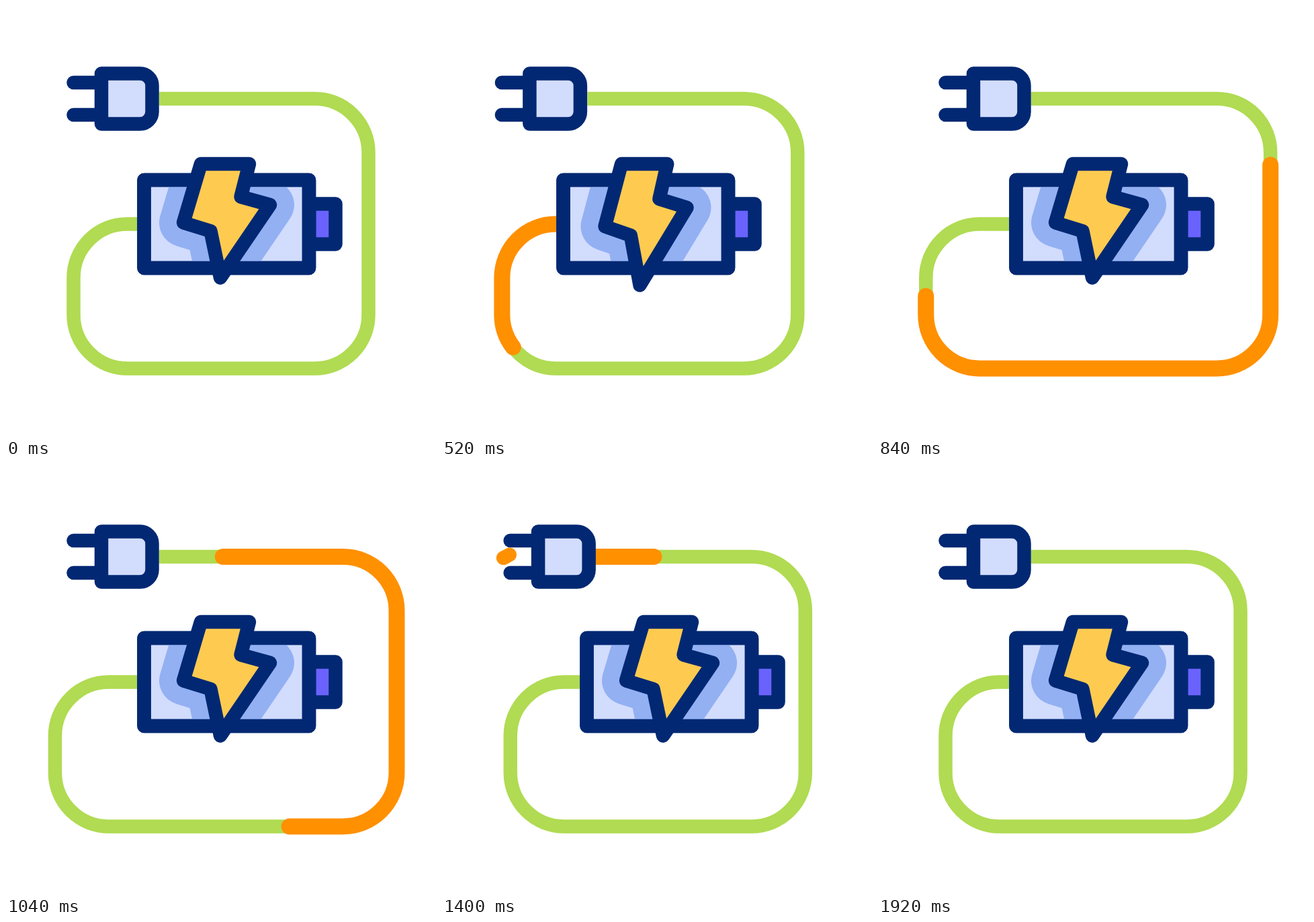
An HTML page with a canvas for the animation above (2080 ms loop, 640 by 640 pixels).

```html
<!DOCTYPE html>
<html lang="en">
<head>
<meta charset="utf-8">
<title>Charging battery</title>
<style>
  html, body { margin: 0; width: 100%; height: 100%; overflow: hidden; background: #fff; }
  canvas { display: block; width: 640px; height: 640px; }
</style>
</head>
<body>
<canvas id="stage" width="640" height="640"></canvas>
<script>
const ctx = document.getElementById('stage').getContext('2d');
const LOOP = 2080, STEP = 40, LINE = 20.5;
const NAVY = '#022873', LILAC = '#d2dcfd', BLUE = '#93b0f3', YELLOW = '#fecb50',
      PURPLE = '#6a62fc', GREEN = '#b0db52', ORANGE = '#ff9000';

const BOLT = [[290, 235], [362, 235], [349.5, 284], [393, 296], [319, 404.5], [304.5, 335], [264, 322.5]];
const SPARK = [[99.5, 135], [82, 144], [64, 131], [45, 144], [32, 136]];

const part = (t, from, to) => Math.min(1, Math.max(0, (t - from) / (to - from)));
const smooth = u => u * u * (3 - 2 * u);

function inOut(t, from, to) {
  const u = part(t, from, to);
  return u < 0.5 ? 0.5 * (2 * u) ** 2.13 : 1 - 0.5 * (2 - 2 * u) ** 2.13;
}

// Rises from 0 to 1, holds, and falls back to 0.
function bump(t, from, top, hold, to) {
  return smooth(part(t, from, top)) * (1 - smooth(part(t, hold, to)));
}

function pose(t) {
  const pull = bump(t, 0, 480, 480, 850);
  const sway = 20 * bump(t, 1360, 1620, 1620, 1920);
  const squash = bump(t, 0, 200, 200, 520);
  const stretch = bump(t, 200, 520, 520, 840);
  return {
    battery: 20 * bump(t, 1180, 1620, 1620, 1920) - 25 * bump(t, 60, 520, 520, 840),
    plug: 7 * bump(t, 1300, 1610, 1610, 1920) - 12 * pull - 4.8 * bump(t, 1100, 1260, 1260, 1440),
    left: sway - 11.5 * pull - 29.5 * bump(t, 540, 860, 980, 1360),
    right: sway - 12 * pull + 45 * bump(t, 480, 860, 980, 1360),
    wide: 1 + 0.045 * squash - 0.054 * stretch,
    tall: 1 - 0.035 * squash + 0.065 * stretch
  };
}

function poly(points, closed) {
  const path = new Path2D();
  points.forEach(([x, y]) => path.lineTo(x, y));
  if (closed) path.closePath();
  return path;
}

function box(x, y, w, h) {
  const path = new Path2D();
  path.rect(x, y, w, h);
  return path;
}

function stroke(path, color, width = LINE) {
  ctx.strokeStyle = color;
  ctx.lineWidth = width;
  ctx.stroke(path);
}

function outlined(path, color) {
  ctx.fillStyle = color;
  ctx.fill(path);
  stroke(path, NAVY);
}

function shifted(dx, paint) {
  ctx.save();
  ctx.translate(dx, 0);
  paint();
  ctx.restore();
}

// Strokes only the part of a path between two fractions of its length.
function trim(path, length, from, to, width) {
  ctx.setLineDash([Math.max(0.05, (to - from) * length), length * 3]);
  ctx.lineDashOffset = -from * length;
  stroke(path, ORANGE, width);
  ctx.setLineDash([]);
}

function drawCable(t, p) {
  const x0 = 195.5 + p.battery, x1 = 228 + p.plug;
  const l = 100.5 + p.left, r = 539.5 + p.right, R = 80;
  const y0 = 324.5, y1 = 138, low = 539.5;
  const path = new Path2D();
  path.moveTo(x0, y0);
  path.arcTo(l, y0, l, low, R);
  path.arcTo(l, low, r, low, R);
  path.arcTo(r, low, r, y1, R);
  path.arcTo(r, y1, x1, y1, R);
  path.lineTo(x1, y1);
  const sides = x0 - l + low - y0 + r - l + low - y1 + r - x1;
  const length = sides + (2 * Math.PI - 8) * R;
  ctx.lineCap = 'butt';
  stroke(path, GREEN);
  ctx.lineCap = 'round';
  if (t >= 200 && t <= 1600)
    trim(path, length, inOut(t, 560, 1600), inOut(t, 200, 1240), 24);
}

function drawSpark(t) {
  if (t < 1240 || t >= 1920) return;
  const length = SPARK.slice(1).reduce((sum, [x, y], i) =>
    sum + Math.hypot(x - SPARK[i][0], y - SPARK[i][1]), 0);
  trim(poly(SPARK), length, inOut(t, 1460, 1920), inOut(t, 1240, 1840), 21);
}

function drawPlug() {
  for (const y of [114, 162]) stroke(poly([[100.5, y], [142, y]]), NAVY);
  const body = new Path2D();
  body.roundRect(142, 100.5, 75.5, 75, [0, 18, 18, 0]);
  outlined(body, LILAC);
}

function drawBattery(p) {
  const shell = box(205.5, 259, 245.5, 131);
  const bolt = poly(BOLT.map(([x, y]) =>
    [328.5 + (x - 328.5) * p.wide, 235 + (y - 235) * p.tall]), true);
  outlined(box(451, 294.5, 39.5, 60), PURPLE);
  outlined(shell, LILAC);
  ctx.save();
  ctx.clip(shell);
  stroke(bolt, BLUE, 72);
  ctx.restore();
  stroke(shell, NAVY);
  outlined(bolt, YELLOW);
}

function draw(t) {
  const p = pose(t);
  ctx.clearRect(0, 0, 640, 640);
  ctx.lineJoin = 'round';
  drawCable(t, p);
  shifted(p.plug, () => {
    drawPlug();
    drawSpark(t);
  });
  shifted(p.battery, () => drawBattery(p));
}

const start = performance.now();
function tick() {
  const t = (performance.now() - start) % LOOP;
  draw(Math.floor(t / STEP) * STEP);
  requestAnimationFrame(tick);
}
tick();
</script>
</body>
</html>
```
